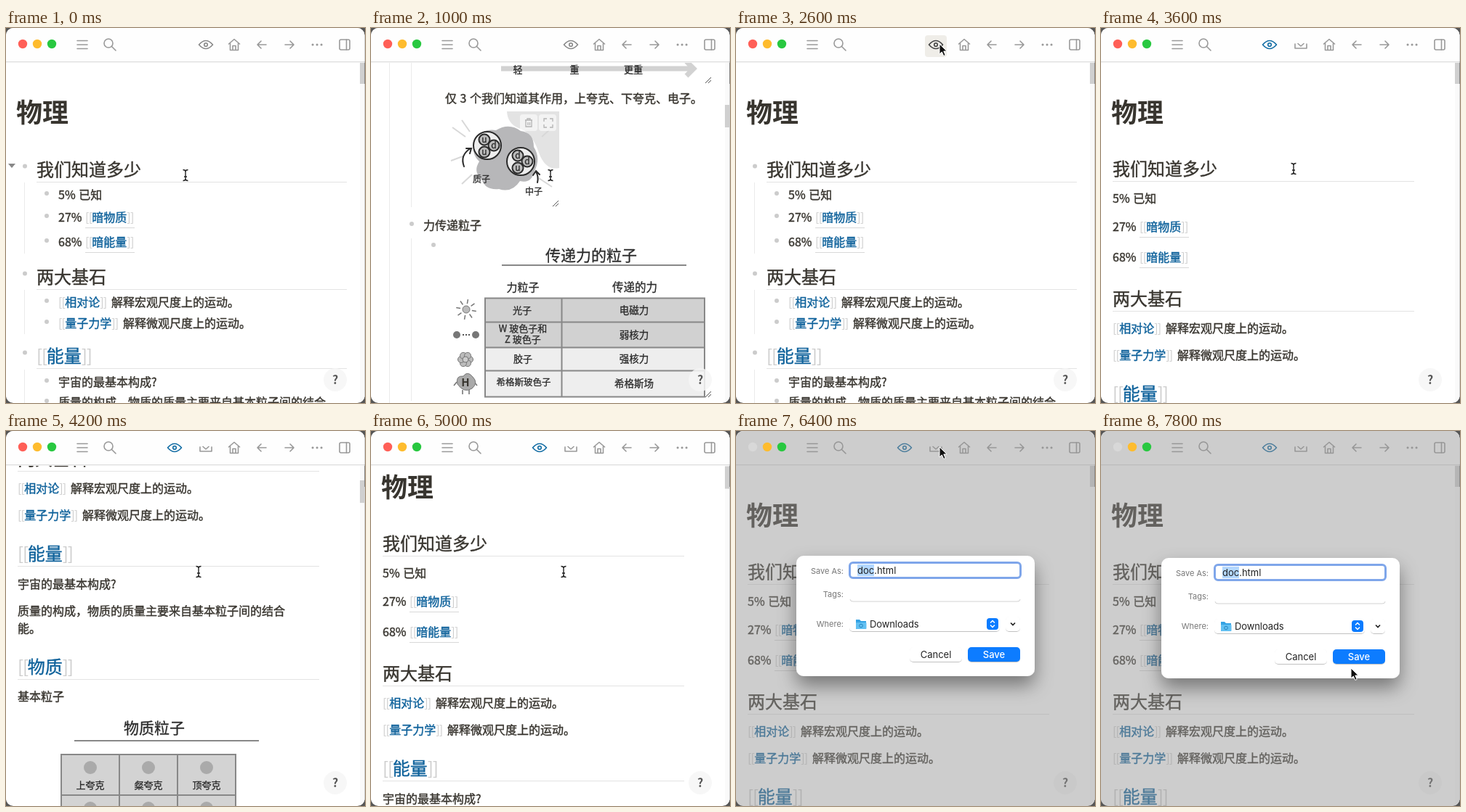
Animation of 494x517 px, one loop 8 s. Source, as an HTML page:

```html
<!DOCTYPE html>
<html lang="zh">
<head>
<meta charset="utf-8">
<style>
html, body { margin: 0; width: 100%; height: 100%; overflow: hidden; background: #555; }
svg { display: block; font-family: "Noto Sans CJK SC", "Noto Sans CJK", "Noto Sans", sans-serif; fill: #38352f; }
text { white-space: pre; }
.row { font-weight: 500; word-spacing: 1px; stroke: #38352f; stroke-width: .4; }
.link { fill: #0f629b; stroke: #0f629b; }
.br { fill: #ccc; stroke: none; letter-spacing: -.05em; font-weight: 300; }
.icon { fill: none; stroke: #999; stroke-width: 1.6; stroke-linecap: round; stroke-linejoin: round; }
.ink { fill: none; stroke: #2b2b2b; stroke-width: 2; stroke-linecap: round; }
.mid { text-anchor: middle; }
.note { fill: #2b2b2b; stroke: #2b2b2b; stroke-width: .3; }
.ui { font-family: Inter, sans-serif; fill: #222; }
.label { fill: #777; text-anchor: end; }
</style>
</head>
<body>
<svg id="stage" width="494" height="517" viewBox="0 0 494 517">
  <defs>
    <clipPath id="frame"><rect width="493.5" height="517" rx="10"/></clipPath>
    <clipPath id="page"><rect y="46" width="487" height="471"/></clipPath>
    <filter id="drop" x="-30%" y="-30%" width="160%" height="190%">
      <feDropShadow dx="0" dy="13" stdDeviation="13" flood-color="#000" flood-opacity=".42"/>
    </filter>
    <filter id="soft" x="-10%" y="-20%" width="120%" height="150%">
      <feDropShadow dx="0" dy=".7" stdDeviation=".6" flood-color="#000" flood-opacity=".35"/>
    </filter>
  </defs>
  <g clip-path="url(#frame)">
    <rect width="494" height="517" fill="#fff"/>
    <g clip-path="url(#page)">
      <g id="outline"></g>
      <g id="preview"></g>
    </g>
    <rect x="487" y="46" width="7" height="471" fill="#fafafa"/>
    <rect id="thumb" x="487" width="6" height="31" fill="#d0d0d0"/>
    <rect x="493" y="46" width="1" height="31" fill="#444"/>
    <circle cx="453" cy="485" r="16" fill="#f6f6f6" fill-opacity=".85"/>
    <text class="mid" x="453" y="490.5" font-size="16" font-weight="700" fill="#555">?</text>

    <rect width="494" height="46" fill="#fefefe"/>
    <path d="M0 46.5H494" stroke="#dedede"/>
    <path d="M0 47.5H494" stroke="#f3f3f3"/>
    <rect id="hover" x="260" y="10" width="30" height="30" rx="4" fill="#efede8"/>
    <g class="icon">
      <path d="M98 17.5H112M98 23H112M98 28.5H112"/>
      <circle cx="141" cy="21" r="6"/><path d="M145.5 25.5L151 31"/>
      <g id="eye"><path d="M-9.5 0Q0-11 9.5 0Q0 11-9.5 0Z"/><circle r="2.3"/></g>
      <path id="save" d="M267 22V28H283V22M271 21.5L275 25L279 21.5"/>
      <path d="M306.5 22L314 15.5L321.5 22M308.5 21V30.5H319.5V21M312 30V24.5H316V30"/>
      <path d="M358 23H346M351 18L346 23L351 28M384 23H396M391 18L396 23L391 28"/>
      <path d="M422 23h.1M428 23h.1M434 23h.1" stroke-width="3"/>
      <rect x="459" y="16" width="14" height="14" rx="2"/><path d="M468.5 16V30"/>
    </g>
    <rect id="dim" width="494" height="517" fill="#969696" fill-opacity=".47"/>
    <circle id="close" cx="23" cy="22" r="6.2"/>
    <circle cx="43" cy="22" r="6.2" fill="#febc2e"/>
    <circle cx="63" cy="22" r="6.2" fill="#28c840"/>
  </g>

  <g id="dialog" class="ui" font-size="13">
    <rect x="83" width="328" height="166" rx="10" fill="#fff" filter="url(#drop)"/>
    <g font-size="11">
      <text class="label" x="148" y="25">Save As:</text>
      <text class="label" x="148" y="57">Tags:</text>
      <text class="label" x="148" y="98">Where:</text>
    </g>
    <rect x="156.5" y="9.5" width="235" height="21" rx="4.5" fill="#fff" stroke="#7fa6ea" stroke-width="3"/>
    <rect x="167" y="12" width="23" height="16" fill="#b3d7ff"/>
    <text x="167" y="25">doc.html</text>
    <path d="M157 60Q157 63 161 63H387Q391 63 391 60" fill="none" stroke="#d2d2d2"/>
    <g fill="#fff" filter="url(#soft)">
      <rect x="156" y="84" width="207" height="20" rx="5"/>
      <rect x="371" y="84" width="20" height="20" rx="5"/>
      <rect x="239" y="126" width="72" height="20" rx="5"/>
      <rect x="319" y="126" width="72" height="20" rx="5" fill="#0a7bff"/>
    </g>
    <path d="M165 88h5l2 2h7v11h-14z" fill="#35a3e4"/>
    <rect x="165" y="92" width="14.5" height="9" rx="1" fill="#62c0f2"/>
    <circle cx="172" cy="96.5" r="2.3" fill="none" stroke="#2584bd"/>
    <text x="184" y="98.5" letter-spacing="-.1">Downloads</text>
    <rect x="345" y="86" width="16" height="16" rx="4" fill="#0a7bff"/>
    <path d="M350 92.5l3-3l3 3M350 95.5l3 3l3-3" fill="none" stroke="#fff" stroke-width="1.5"/>
    <path d="M378 92.5l3 3l3-3" fill="none" stroke="#222" stroke-width="1.7"/>
    <text class="mid" x="275" y="140.5">Cancel</text>
    <text class="mid" x="355" y="140.5" fill="#fff" font-weight="500">Save</text>
  </g>

  <g id="beam" fill="none">
    <path id="bar" d="M-3.5-7.5Q0-7.5 0-5Q0-7.5 3.5-7.5M0-5V5M-3.5 7.5Q0 7.5 0 5Q0 7.5 3.5 7.5M-2 2H2" stroke="#222" stroke-width="1.4"/>
  </g>
  <path id="arrow" d="M0 0V14L3.3 11L5.8 16.5L8.2 15.4L5.8 10H10.2Z" fill="#111" stroke="#fff"/>
</svg>
<script>
const $ = id => document.getElementById(id);

// kind, centre y while editing, centre y in the reading view, text
const items = [
  ['h', 195, 194, '我们知道多少'],
  ['r', 230, 235, '5% 已知'],
  ['u', 261, 274, '27% [[暗物质]]'],
  ['u', 295, 316, '68% [[暗能量]]'],
  ['h', 343, 373, '两大基石'],
  ['r', 378, 414, '[[相对论]] 解释宏观尺度上的运动。'],
  ['r', 407, 451, '[[量子力学]] 解释微观尺度上的运动。'],
  ['h', 452, 504, '[[能量]]'],
  ['r', 488, 546, '宇宙的最基本构成?'],
  ['r', 516, 583, '质量的构成，物质的质量主要来自基本粒子间的结合'],
  ['t', 540, 607, '能。'],
  ['h', 590, 660, '[[物质]]'],
  ['r', 626, 701, '基本粒子'],
  ['n', 1008, 1083, '仅 3 个我们知道其作用，上夸克、下夸克、电子。'],
  ['r', 1183, 1258, '力传递粒子'],
  ['h', 1470, 1545, '[[力]]'],
  ['r', 1506, 1582, '引力、电磁力、强核力、弱核力'],
  ['r', 1535, 1619, '量子场论统一了后三种力。'],
  ['h', 1584, 1668, '未解之谜'],
  ['r', 1620, 1709, '为什么物质多于反物质?'],
  ['r', 1649, 1746, '引力能否量子化?']
];
const indent = { h: 42, r: 72, u: 72, t: 72, n: 102 };

const text = (x, y, size, str, attrs = '') =>
  `<text x="${x}" y="${y + size * .38}" font-size="${size}" ${attrs}>${str}</text>`;
const mid = (x, y, size, str) => text(x, y, size, str, 'class="mid note"');
const line = (d, color = '#e3e3e3', w = 1) =>
  `<path d="${d}" fill="none" stroke="${color}" stroke-width="${w}"/>`;
const dot = (x, y, r, fill, attrs = '') =>
  `<circle cx="${x}" cy="${y}" r="${r}" fill="${fill}" ${attrs}/>`;
const box = (x, y, w, h, fill, attrs = '') =>
  `<rect x="${x}" y="${y}" width="${w}" height="${h}" fill="${fill}" ${attrs}/>`;
const grip = (x, y) => line(`M${x - 4} ${y + 4}l8-8M${x} ${y + 4}l4-4`, '#555');
const links = s => s.replace(/\[\[(.+?)\]\]( ?)/g,
  '<tspan class="br">[[</tspan><tspan class="link">$1</tspan><tspan class="br">]]</tspan><tspan dx="2">$2</tspan>');

function row([kind, edit, read, str], reading) {
  const x = reading ? 16 : indent[kind], y = reading ? read : edit;
  const head = kind === 'h';
  let out = text(x, y, head ? 24 : 16, links(str), 'class="row"');
  if (head) out += line(`M${x} ${y + 17.5}H${reading ? 431 : 469}`);
  if (kind === 'u') out += line(`M${x + 37} ${y + 14.5}h68`, '#d8d8d8');
  if (!reading && 'hru'.includes(kind)) out += dot(x - 16, y - (head ? 4.5 : 2), 3, '#ccc');
  return out;
}

function matter() {
  const names = ['上夸克', '粲夸克', '顶夸克', '下夸克', '奇夸克', '底夸克',
    '电子', 'μ 子', 'τ 子', '电中微子', 'μ 中微子', 'τ 中微子'];
  let out = mid(290, -242, 21, '物质粒子') + line('M180-224H434', '#888', 2);
  names.forEach((name, i) => {
    const x = 162 + i % 3 * 80, y = -205 + (i / 3 | 0) * 56;
    out += box(x, y, 80, 56, i < 6 ? '#d3d3d3' : '#eee', 'stroke="#888" stroke-width="2"') +
      dot(x + 40, y + 18, 9, '#aaa') + mid(x + 40, y + 42, 13, name);
  });
  return out + line('M179 56H442M434 46L444 56L434 66', '#d2d2d2', 7) +
    mid(202, 57, 13, '轻') + mid(280, 57, 13, '重') + mid(361, 57, 13, '更重') + grip(464, 72);
}

function trio(x, y, kinds) {
  const spots = [[-4, -8], [9, 0], [-4, 9]];
  return dot(x, y, 19, '#eee', 'class="ink" style="fill:#eee"') + spots.map(([dx, dy], i) =>
    dot(x + dx, y + dy, 7.5, '#bbb', 'stroke="#2b2b2b" stroke-width="2"') +
    mid(x + dx, y + dy - 1, 12, kinds[i])).join('');
}

function nucleus(reading) {
  let out = '<path d="M187 115H259V193Q240 197 231 172Q222 144 203 138Q188 132 187 115Z" fill="#e3e3e3"/>' +
    '<path d="M142 158Q150 138 172 141Q190 130 206 142Q224 144 224 164Q234 180 225 197Q221 215 205 211Q194 228 176 222Q157 224 152 208Q140 198 149 184Q138 174 142 158Z" fill="#b7b7b9"/>' +
    line('M112 137L130 150M125 127L136 143M110 183L126 177M235 150L246 140M231 207L249 219M125 215L139 202', '#d8d8d8', 2) +
    trio(160, 162, 'udu') + trio(206, 184, 'ddu') +
    '<path class="ink" d="M128 191Q122 175 137 166M131 166l7 0l-2 7M229 213Q231 205 227 198M223 203l4-6l5 5"/>' +
    mid(152, 208, 12, '质子') + mid(224, 225, 12, '中子') + grip(254, 242);
  if (!reading) {
    out += '<g id="tools">' + box(205, 119, 24, 23, '#fff', 'rx="4" opacity=".6"') +
      box(231, 119, 24, 23, '#fff', 'rx="4" opacity=".6"') +
      line('M212 127H222M215 127V125H219V127M213 127V136H221V127M216 130V134M218.5 130V134', '#b4b4b4', 1.3) +
      line('M238 129V125H242M246 125H250V129M250 133V137H246M242 137H238V133', '#b4b4b4', 1.3) + '</g>';
  }
  return out;
}

function forces() {
  const rows = [372, 405, 440, 472, 508];
  let out = mid(303, 313, 21, '传递力的粒子') + line('M180 327H434', '#888', 2) +
    mid(209, 357, 15, '力粒子') + mid(363, 357, 15.5, '传递的力') +
    box(157, 372, 302, 68, '#d1d1d1') + box(157, 440, 302, 68, '#eee');
  rows.forEach(y => out += line(`M156 ${y + .5}H460`, '#888', 2));
  out += line('M157 372V508M262.5 372V508M459 372V508', '#888', 2);
  out += mid(208, 389, 13, '光子') + mid(209, 414, 13, 'W 玻色子和') + mid(209, 429, 13, 'Z 玻色子') +
    mid(209, 456, 13, '胶子') + mid(210, 488, 12.5, '希格斯玻色子');
  ['电磁力', '弱核力', '强核力', '希格斯场'].forEach((s, i) => out += mid(362, 389 + i * 33.5, 13.5, s));
  for (let a = 0; a < 8; a++)
    out += `<path d="M8 0H14" transform="translate(131 388) rotate(${a * 45 + 10})" stroke="#777" stroke-width="1.5"/>`;
  out += dot(131, 388, 5, '#bbb', 'stroke="#777"') + dot(118, 423, 5, '#777') + dot(144, 423, 5, '#777') +
    line('M126 423h2m2 0h2m2 0h2', '#555', 2);
  for (let a = 0; a < 6; a++)
    out += dot(130 + 6 * Math.cos(a * 1.047), 457 + 6 * Math.sin(a * 1.047), 4.5, '#bbb', 'stroke="#777"');
  out += dot(130, 457, 4, '#ccc', 'stroke="#777"') +
    line('M118 488L114 493M142 488L146 493M126 499V505M135 499V505', '#777', 1.6) +
    '<path d="M119 491Q116 479 127 480Q133 472 140 481Q148 489 139 497Q128 504 119 491Z" fill="#aaa" stroke="#777"/>' +
    text(130, 488, 15, 'H', 'class="mid" font-weight="700"');
  return out + grip(464, 505);
}

function build(reading) {
  let out = text(14, 116, 36, '物理', 'font-weight="700"');
  if (!reading) {
    out += line('M25.5 213V311M25.5 361V422M25.5 471V560M25.5 608V1440M25.5 1488V1552M25.5 1602V1667M55.5 642V1158M55.5 1201V1425', '#ebebeb') +
      '<path id="fold" d="M3 187H13L8 193Z" fill="#888"/>' + dot(86, 1210, 3, '#ccc');
  }
  out += items.map(item => row(item, reading)).join('');
  return out + `<g transform="translate(${reading ? '-86 986' : '0 911'})">${matter()}${nucleus(reading)}${forces()}</g>`;
}

$('outline').innerHTML = build(false);
$('preview').innerHTML = build(true);

const editScroll = [[200, 0], [400, 30], [600, 240], [1000, 911], [1400, 1130], [1600, 1050], [2000, 240], [2200, 0]];
const readScroll = [[3600, 0], [4000, 170], [4400, 500], [4600, 430], [5000, 39], [5200, 0]];
const mouseX = [[2200, 247], [2600, 280], [2800, 280], [3400, 265], [5200, 265], [5800, 280], [6800, 280], [7800, 344]];
const mouseY = [[2200, 203], [2600, 22], [2800, 22], [3400, 194], [5200, 194], [5800, 22], [6800, 22], [7800, 327]];

function track(keys, t) {
  const i = keys.findIndex(k => k[0] > t);
  if (i === 0) return keys[0][1];
  if (i < 0) return keys[keys.length - 1][1];
  const [t0, a] = keys[i - 1], [t1, b] = keys[i];
  return a + (b - a) * (t - t0) / (t1 - t0);
}

const show = (id, on) => $(id).style.display = on ? '' : 'none';
const move = (id, x, y) => $(id).setAttribute('transform', `translate(${x} ${y})`);

function draw(now) {
  const t = Math.floor(now % 8000 / 200) * 200;
  const reading = t >= 2800, asking = t >= 6400;
  const scroll = track(reading ? readScroll : editScroll, t);
  const x = track(mouseX, t), y = track(mouseY, t);
  const hover = !asking && y < 40 && Math.abs(x - 275) < 15;
  const pointing = asking || y < 46;

  show('outline', !reading);
  show('preview', reading);
  move(reading ? 'preview' : 'outline', 0, -scroll);
  $('thumb').setAttribute('y', 46 + scroll * 60 / 911);
  show('fold', y === 203);
  show('tools', scroll > 867 && scroll < 999);

  move('eye', reading ? 232 : 275, 23);
  $('eye').style.stroke = reading ? '#106ba3' : hover ? '#444' : '#888';
  show('save', reading);
  $('save').style.stroke = hover ? '#444' : '#999';
  show('hover', hover);

  show('dim', asking);
  $('close').style.fill = asking ? '#d8d8d8' : '#ff5f57';
  show('dialog', asking);
  move('dialog', 0, t < 7000 ? 172 : 175);

  show('beam', !pointing);
  show('arrow', pointing);
  move(pointing ? 'arrow' : 'beam', x, y);
}

const start = performance.now();
function tick() {
  draw(performance.now() - start);
  requestAnimationFrame(tick);
}
tick();
</script>
</body>
</html>
```
